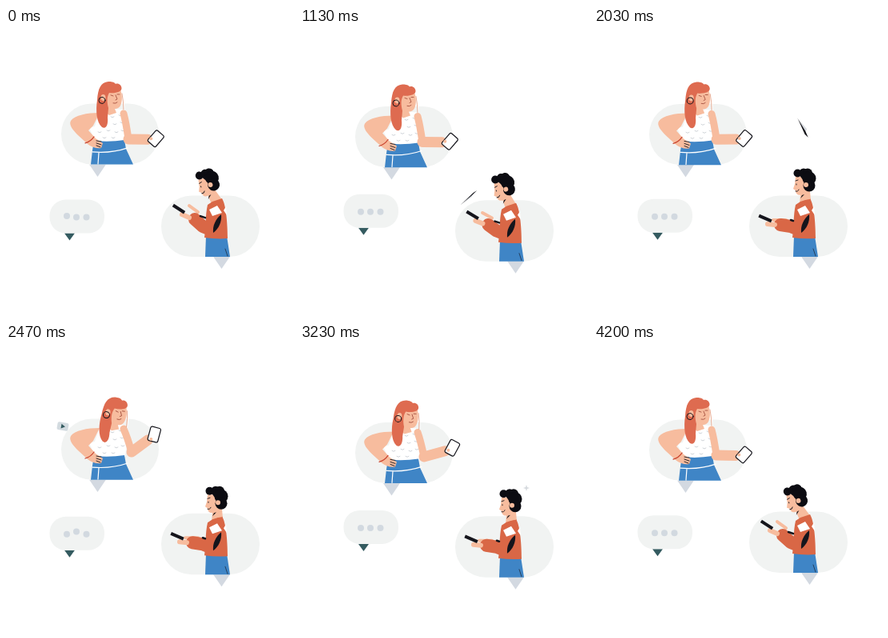
Write an HTML page that moves like this. It is 360 px wide and 360 px high and loops after 4230 ms.

```html
<!DOCTYPE html>
<html lang="en">
<head>
<meta charset="utf-8">
<title>Chatting friends</title>
<style>
html, body { margin: 0; width: 100%; height: 100%; overflow: hidden; background: #fff; }
svg { display: block; width: 100vw; height: 100vh; }
.bubble { fill: #f1f3f2; }
.tail { fill: #d3d9e1; }
.skin { fill: #f7bc9e; }
.hair { fill: #de6b50; }
.blue { fill: #3f85c6; }
.shirt { fill: #d96746; }
.white { fill: #fff; }
.line { fill: none; stroke: #15151c; stroke-linecap: round; stroke-linejoin: round; }
.limb { fill: none; stroke: #f7bc9e; stroke-linecap: round; stroke-linejoin: round; }
</style>
</head>
<body>
<svg viewBox="0 0 360 360">
  <g id="typing">
    <path d="M73 256H86L79.500 265Z" fill="#345b60"/>
    <rect class="bubble" x="54.500" y="214" width="68.500" height="42" rx="20"/>
    <g fill="#d2d9e0">
      <circle id="dot0" cx="76" cy="236" r="4"/>
      <circle id="dot1" cx="88" cy="236" r="4"/>
      <circle id="dot2" cx="100.500" cy="236" r="4"/>
    </g>
  </g>

  <g id="woman">
    <path class="tail" d="M104 170.500H125L114.500 186Z"/>
    <rect class="bubble" x="69" y="94.500" width="122" height="76" rx="38"/>
    <path class="white" d="M117 106L130 101L147 102C151 108 152 115 151 122L149 142L109 144L107 131L104 125L111 123Z"/>
    <g class="line" style="stroke:#c3c8cf" stroke-width=".8">
      <path d="M131 111q2 2 4 0M141 109q2 2 4 0M134 120q2 2 4 0M143 118q2 2 4 0M115 130q2 2 4 0M126 128q2 2 4 0M136 130q2 2 4 0M144 128q2 2 4 0M121 137q2 2 4 0M132 137q2 2 4 0"/>
    </g>
    <path class="blue" d="M110 141Q130 143 148 140L150 151L159 170.700H106L108 153Z"/>
    <path class="line" style="stroke:#fff" stroke-width="1.200" d="M108 155Q132 157 152 150M116 156L115 170"/>
    <path class="skin" d="M117 106C101 106 86 109 81 116C78 121 84 128 90 134L102 145C107 149 113 151 119 150L121 144L112 138L103 128L109 122Z"/>
    <path class="line" style="stroke:#c9432e" stroke-width="1.200" d="M99 144Q106 142 110 136"/>
    <path class="line" stroke-width=".9" d="M113 141L119 142M113 144L119 146M113 147L118 149"/>
    <path class="limb" id="upperArm" stroke-width="9"/>
    <path class="limb" id="foreArm" stroke-width="13"/>
    <g id="womanPhone">
      <rect x="-6.500" y="-9" width="13" height="18" rx="2" fill="#fff" stroke="#15151c" stroke-width="1.200"/>
    </g>
    <circle class="skin" id="thumb" r="2"/>
    <g id="womanHead">
      <path class="skin" d="M124 80L143 76C145 83 146 91 143 97C141 101 137 101 136 101L138 106L129 109L123 104Z"/>
      <path class="hair" d="M128 67C118 68 115 76 114 90C112 103 113 118 120 124C125 127 128 121 127 112L128 100C126 92 126 86 129 81C136 82 145 80 144.500 75C144 70 139 69 137 70C135 67 131 67 128 67Z"/>
      <ellipse class="skin" cx="121.500" cy="87" rx="3" ry="4"/>
      <circle class="line" cx="120" cy="90.500" r="4" stroke-width="1"/>
      <path class="line" style="stroke:#9c4535" stroke-width=".8" d="M131 84l3 1M139 83l3 0M137 84L139 89L137 90M134 94q3 1 5-1"/>
      <path class="line" style="stroke:#fff" stroke-width="1.200" d="M146 82Q148 92 148 102"/>
      <path class="line" style="stroke:#e39a7c" stroke-width=".8" d="M145 82Q147 92 147 102"/>
    </g>
  </g>

  <g id="man">
    <path class="tail" d="M259 285.700H280L269.500 301Z"/>
    <rect class="bubble" x="194" y="209.500" width="123" height="76.500" rx="38"/>
    <path class="blue" d="M250 260H276L280 286H249Z"/>
    <path class="line" style="stroke:#24405f" stroke-width="1" d="M274 276L277 285"/>
    <path class="skin" id="neck"/>
    <path class="shirt" d="M252 221L258 217L270 213C275 221 277 243 277 263Q263 264 248 262C250 249 249 234 252 221Z"/>
    <path class="white" d="M254 227L264 222L270 231L258 235ZM272 228L275 223L276 234Z"/>
    <path d="M269 233C262 239 258 247 259 256C266 251 270 242 269 233Z" fill="#15151c"/>
    <path class="limb" id="backHand" stroke-width="4"/>
    <path id="sleeve" class="limb" style="stroke:#d96746" stroke-width="16"/>
    <path class="limb" id="frontHand" stroke-width="6"/>
    <path id="cuff" class="line" stroke-width="2.500"/>
    <path id="manPhone" d="M-8.500 -2H8.500V2H-8.500Z" fill="#15151c"/>
    <g id="manHead">
      <path class="skin" d="M252 186L251 195L249 201L252 203C252 208 256 210 261 208L262 215L270 214L269 198L264 186Z"/>
      <g fill="#0c0c12">
        <circle cx="254.500" cy="181.500" r="5"/>
        <circle cx="262" cy="181" r="5.500"/>
        <circle cx="267" cy="181.500" r="6"/>
        <circle cx="269" cy="188" r="8.500"/>
        <circle cx="269" cy="197" r="7.500"/>
        <path d="M256 183H268V192L262 191Z"/>
        <path d="M258 213L263 208L260 209Z"/>
      </g>
      <circle class="skin" cx="265" cy="196" r="3"/>
      <path class="line" stroke-width=".9" d="M252 191l3-1M253 195v1M252 204q3 1 4-2"/>
    </g>
  </g>

  <g id="plane">
    <path d="M-10 2L6 2L3.500 9.500Z" fill="#d5d9de"/>
    <path d="M-14 0L8 -3.500L13.500 1L5 2.500Z" fill="#0c0c12"/>
  </g>
  <g id="card">
    <rect x="-7" y="-5" width="14" height="10" rx="2" fill="#d3dbe0"/>
    <path d="M-2 -3L3 0L-2 3Z" fill="#345b60"/>
  </g>
  <path id="spark" d="M0 -4L1 -1L4 0L1 1L0 4L-1 1L-4 0L-1 -1Z" fill="#d5d9de"/>
</svg>
<script>
const LOOP = 4230, BOB = LOOP / 2;
const el = id => document.getElementById(id);
const set = (id, name, value) => el(id).setAttribute(name, value);
const mix = (a, b, k) => a + (b - a) * k;
const ease = (t, from, to) => {
  const k = Math.min(1, Math.max(0, (t - from) / (to - from)));
  return k * k * (3 - 2 * k);
};
const between = (t, inA, inB, outA, outB) => ease(t, inA, inB) - ease(t, outA, outB);
const bob = (t, peak, mid, amp) => mid + amp * Math.cos(2 * Math.PI * (t - peak) / BOB);
const place = (id, x, y, turn = 0, scale = 1) =>
  set(id, 'transform', `translate(${x} ${y}) rotate(${turn}) scale(${scale})`);

// time, x, y, heading, roll
const flight = [
  [420, 143, 221, 28, 1], [730, 181, 240, 22, 1], [1130, 211, 212, -42, .2],
  [1530, 232, 172, -22, -.7], [1800, 252, 132, -30, -.5],
  [2030, 261, 125, 62, -.4], [2330, 267, 165, 82, -.4]
];

function drawPlane(t) {
  let i = 0;
  while (i < flight.length - 2 && t > flight[i + 1][0]) i++;
  const at = n => flight[Math.min(flight.length - 1, Math.max(0, n))];
  const [p, a, b, q] = [at(i - 1), at(i), at(i + 1), at(i + 2)];
  const k = Math.min(1, Math.max(0, (t - a[0]) / (b[0] - a[0])));
  const curve = j => a[j] + .5 * k * (b[j] - p[j] + k * (2 * p[j] - 5 * a[j] + 4 * b[j] - q[j]
    + k * (3 * (a[j] - b[j]) + q[j] - p[j])));
  const size = between(t, 420, 600, 2120, 2330);
  place('plane', curve(1), curve(2), mix(a[3], b[3], k), `${size} ${size * mix(a[4], b[4], k)}`);
}

function drawWoman(t) {
  const raise = between(t, 1980, 2440, 2850, 3600);
  const swing = 4 * Math.sin(Math.PI * raise);
  const x = 187.3 - 2 * raise + swing, y = mix(138.3, 114, raise);
  const elbow = `${mix(153, 157, raise)} ${mix(139, 136, raise)}`;
  const hand = [x - mix(8, 6, raise), y + mix(1, 7, raise)];
  place('woman', 0, bob(t, 1355, 1.5, 2.5));
  set('upperArm', 'd', `M147 107Q${mix(150, 152, raise)} 118 ${elbow}`);
  set('foreArm', 'd', `M${elbow}L${hand[0] - 2} ${hand[1]}`);
  place('womanPhone', x, y, mix(41, 15, raise));
  place('thumb', hand[0] + 2, hand[1] - 1);
  set('womanHead', 'transform', `translate(${3 * raise} 0) rotate(${8 * raise} 128 108)`);
}

function drawMan(t) {
  const up = between(t, 1020, 1420, 3500, 4000);
  const p = (x0, y0, x1, y1) => `${mix(x0, x1, up)} ${mix(y0, y1, up)}`;
  place('man', 0, bob(t, 970, 3, 3));
  set('manHead', 'transform',
    `translate(${mix(-10.5, 0, up)} 0) rotate(${mix(-14, 0, up)} 265 192)`);
  set('neck', 'd', `M${p(251, 206, 258, 208)}L${p(261, 202, 270, 204)}L271 216L257 220Z`);
  set('sleeve', 'd', `M251 250L246 248L${p(236, 239, 233, 246)}`);
  set('frontHand', 'd', `M${p(229, 237, 226, 246)}L${p(220, 233, 217, 245)}`);
  set('backHand', 'd', `M${p(240, 230, 240, 240)}L${p(229, 222, 224, 240)}`);
  set('cuff', 'd', `M${p(243, 235, 246, 240)}L${p(249, 237, 249, 241)}`);
  place('manPhone', mix(216, 214, up), mix(226, 238, up), mix(33, 23, up));
}

function drawTyping(t) {
  place('typing', 0, -bob(t, 1330, 2.5, 4.5));
  for (let i = 0; i < 3; i++) {
    const k = (t % BOB - 130 - 280 * i) / 230;
    const hop = Math.abs(k) < 1 ? 4 * Math.cos(k * Math.PI / 2) ** 2 : 0;
    set('dot' + i, 'cy', 236 - hop);
  }
}

function draw(t) {
  drawWoman(t);
  drawMan(t);
  drawTyping(t);
  drawPlane(t);
  place('card', 71, 103 - (t - 2470) / 90, 10, between(t, 2260, 2420, 2650, 2850));
  place('spark', 283, 180 - (t - 3230) / 90, 0, between(t, 3040, 3200, 3320, 3500));
}

function frame(now) {
  draw(now % LOOP);
  requestAnimationFrame(frame);
}
draw(0);
requestAnimationFrame(frame);
</script>
</body>
</html>
```
